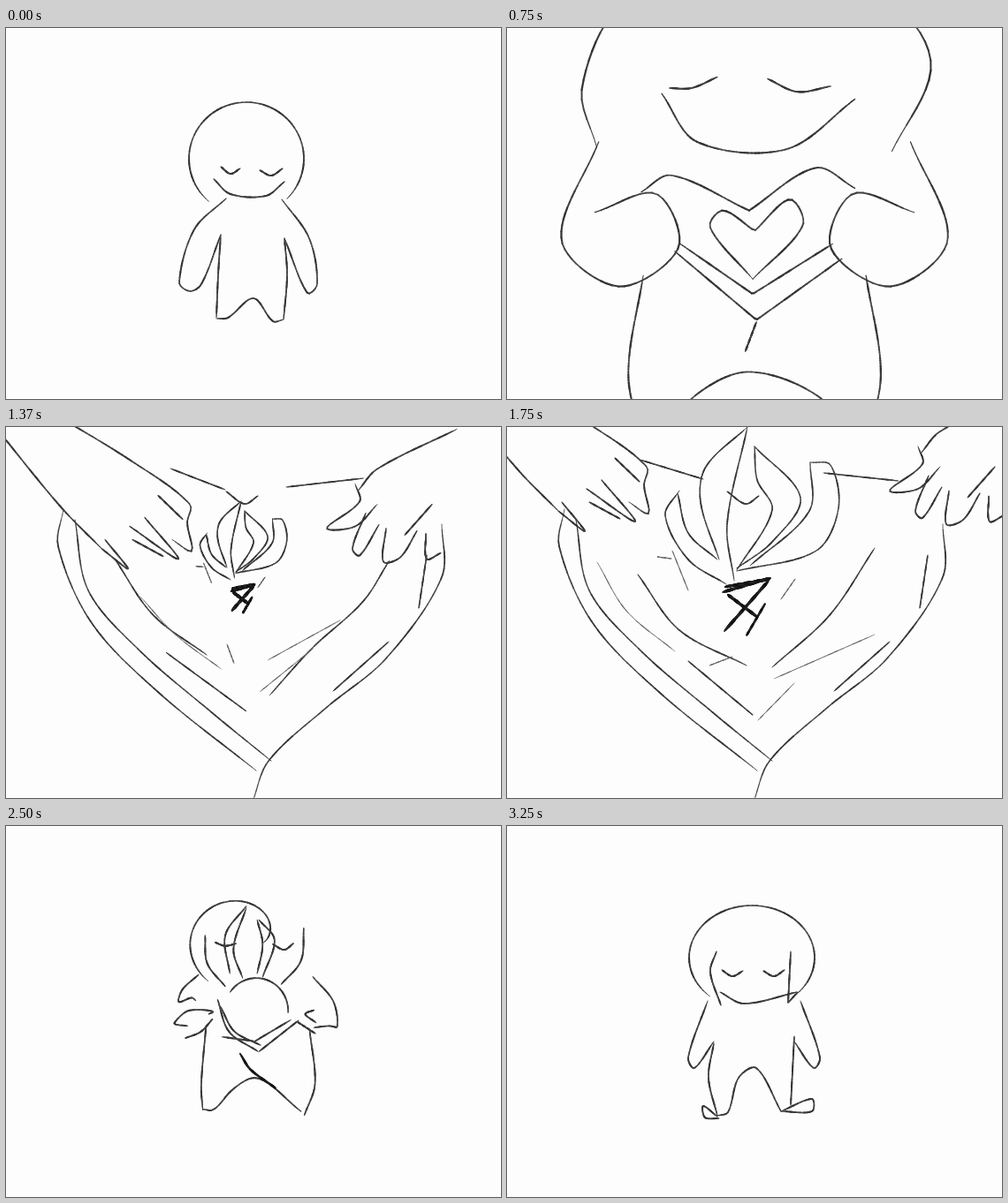
An HTML page with a canvas that plays this animation: 560x420 px, repeating every 3.37 s.

```html
<!DOCTYPE html>
<html lang="en">
<head>
<meta charset="utf-8">
<title>Heart bloom</title>
<style>
html, body { margin: 0; width: 100%; height: 100%; overflow: hidden; background: #fdfdfd; }
canvas { display: block; width: 560px; height: 420px; }
</style>
</head>
<body>
<canvas id="stage" width="560" height="420"></canvas>
<script>
const ctx = document.getElementById('stage').getContext('2d');
const LOOP = 3370;

// Smooth strokes through points; "/" lifts the pencil, a doubled point is a corner.
// "o" is an elliptic arc (centre, radii, angles); "~" mirrors another part about an axis.
const stand = {
  head: 'o 272 148 65 64 131 405',
  eyeL: '243 157 254 165 265 159',
  eyeR: '287 161 300 167 313 159',
  mouth: '235 171 254 188 294 190 315 174',
  armL: '249 193 213 228 196 288 208 298 221 290 243 234',
  armR: '312 194 343 238 352 290 341 300 315 238',
  bodyL: '243 234 240 280 238 328',
  arch: '238 329 251 328 280 306 302 332 314 330',
  bodyR: '315 238 318 280 314 330'
};

const love = {
  head: '186 212 178 180 200 134 270 100 352 141 366 170 345 214',
  eyeL: '225 180 237 180 251 174',
  eyeR: '278 175 294 182 312 179',
  mouth: '221 183 240 209 288 213 325 186',
  armL: '187 209 167 262 198 287 230 266 218 237 185 247',
  armR: '~271 armL',
  bodyL: '211 281 203 335 212 374',
  arch: '214 374 240 345 268 333 305 346 331 376',
  bodyR: '~271 bodyL',
  rim: '210 236 226 227 268 246 268 246 304 223 325 234 / 228 268 272 305 272 305 318 272',
  band: '231 264 270 291 270 291 313 264 / 272 306 266 322',
  core: '270 283 247 255 254 246 271 257 271 257 290 240 297 254 270 283'
};

const bloom = {
  head: 'o 277 132 68 62 135 425',
  eyeL: '233 121 252 126',
  eyeR: '301 127 312 131 319 123',
  hairL: '225 112 225 150 243 182',
  hairR: '328 97 327 145 305 178',
  petals: '272 98 249 130 254 172 / 272 100 258 145 268 177 / 284 113 290 140 284 172 / 286 113 303 135 290 176',
  ball: 'o 283 213 35 36 215 363',
  fold: '241 188 250 230 285 257 / 247 186 256 226 291 245 / 287 258 325 228',
  foldIn: '248 206 287 231 287 231 330 204',
  armL: '222 170 199 198 / 211 240 189 222 205 201 240 212 225 222 / 235 222 222 236 205 243',
  armR: '351 176 369 215 357 244 / 357 204 322 208 334 223 / 328 225 348 238',
  bodyL: '219 247 219 310 226 335',
  arch: '226 335 245 326 280 289 324 332',
  bodyR: '348 245 348 305 330 338',
  shade: '285 291 325 332'
};

const shawl = {
  head: 'o 280 138 76 62 130 265 / o 280 138 76 61 272 417',
  eyeL: '243 158 257 164 272 155',
  eyeR: '~286.5 eyeL',
  mouth: '232 186 280 200 319 186',
  hairL: '229 152 234 175 256 191',
  hairR: '~286.5 hairL',
  armL: '217 177 186 203 183 226 225 203 238 206 / 203 217 199 234 238 210',
  armR: '338 175 372 206 375 246 362 231 333 216 / 334 222 367 230',
  bodyL: '239 206 228 270 222 306',
  arch: '222 304 231 312 252 290 290 285 342 313',
  bodyR: '334 222 347 280 343 315',
  fold: '240 216 257 243 284 258 / 240 236 284 258 / 284 258 335 218',
  foldIn: '242 285 268 269 268 269 310 246',
  shade: '241 222 248 242 280 257 / 335 213 310 238'
};

const rest = {
  head: 'o 277 149 71 59 132 405',
  eyeL: '243 163 255 170 267 164',
  eyeR: '~278.5 eyeL',
  mouth: '241 188 268 201 328 188',
  hairL: '237 142 230 165 242 203',
  hairR: '321 142 318 200 318 200 329 188',
  armL: '227 198 205 262 212 274 234 244',
  armR: '~279.5 armL',
  bodyL: '234 246 228 285 238 328',
  arch: '238 328 250 324 262 285 282 274 310 323',
  bodyR: '325 238 321 316',
  feet: '238 329 222 317 224 330 240 331 / 310 323 345 309 345 323 310 323'
};

const heart = {
  rimL: '65 93 59 135 97 222 172 300 283 389',
  rimR: '493 110 493 170 430 262 362 318 297 378 279 424',
  inL: '78 105 93 185 150 252 235 325 300 378',
  inR: '476 145 467 205 / 433 243 370 299'
};
const shut = {
  top: '222 57 274 83 / 276 84 366 55',
  creaseL: '99 133 140 200 183 246 / 158 246 265 317',
  creaseR: '297 335 350 265 420 215 451 166',
  thin: '202 231 297 294 / 245 232 287 265 / 290 243 341 202 / 291 267 370 212'
};
const open = {
  top: '150 37 222 59 / 358 52 443 61 / 249 73 270 87 285 78',
  creaseL: '148 167 195 230 271 270 / 205 265 278 326',
  creaseR: '300 272 365 213 416 137',
  thin: '102 153 135 208 190 254 / 255 260 229 270 / 302 285 416 235 / 284 332 325 290'
};

const holdL = {
  arm: '125 -8 160 32 / 162 33 222 54 / 222 56 263 100 260 153 / -70 -4 0 42 102 122',
  fingers: '104 125 165 158 198 195 208 180 183 139 / 236 102 260 140 / 219 120 246 153 248 182 232 187 / 188 138 228 162 241 187'
};
const holdR = {
  arm: '500 -2 453 28 / 440 36 366 50 / 364 56 318 72 313 103 / 630 60 485 118 475 135 / 469 149 437 162',
  knuckles: '318 103 288 115 286 145 / 283 112 269 138 284 153 / 345 130 308 136 284 158',
  fingers: '346 130 318 148 314 190 335 190 360 160 / 372 158 348 190 358 215 370 178 / 410 160 417 195 436 165 / 432 138 372 183'
};
const pullL = {
  arm: '-60 -40 12 48 58 95 / 0 -60 92 -4 158 45 155 66 160 98 138 85',
  fingers: '122 35 150 62 / 107 60 145 107 90 70 / 62 85 88 118 58 95 / 93 85 128 104'
};
const pullR = {
  arm: '580 -40 490 5 468 30 / 465 22 470 42 433 72 465 70 490 45',
  fingers: '477 55 462 95 470 103 492 68 / 500 72 497 110 516 105 535 75 / 545 78 546 107 562 100 / 552 45 521 80'
};

const bud = {
  core: '248 160 265 152 280 160 / 245 168 241 185 271 225 271 225 305 203 / 285 162 315 180 301 206'
};
const flower = {
  tall: '272 0 225 45 219 85 240 150 / 272 0 249 110 257 174',
  mid: '280 22 283 60 300 94 260 162 / 280 22 332 80 300 130 260 160',
  right: '343 40 366 43 375 92 350 140 260 163 / 343 40 342 95 275 157',
  left: '195 72 179 100 205 150 248 178 / 193 75 205 120 238 150',
  thin: '170 147 186 149 / 187 140 205 185 / 310 195 326 172'
};
const scribble = {
  ink: '244 187 298 171 / 296 174 246 231 / 250 190 283 215 / 247 181 297 172',
  shade: '292 200 271 236'
};

const WIDTH = { ink: 3.4, shade: 2.5, thin: 1 };
const N = 64;
const mix = (a, b, k) => a + (b - a) * k;
const ease = k => k * k * (3 - 2 * k);

function arc(x, y, rx, ry, from, to) {
  return Array.from({ length: N }, (_, i) => {
    const a = mix(from, to, i / (N - 1)) * Math.PI / 180;
    return [x + rx * Math.cos(a), y + ry * Math.sin(a)];
  });
}

function curve(text) {
  const v = text.match(/-?[\d.]+/g).map(Number), p = [];
  if (text.includes('o')) return arc(...v);
  for (let i = 0; i < v.length; i += 2) p.push([v[i], v[i + 1]]);
  const out = [p[0]];
  for (let i = 0; i + 1 < p.length; i++) {
    const b = p[i], c = p[i + 1];
    const span = Math.hypot(c[0] - b[0], c[1] - b[1]);
    if (!span) continue;
    const a = p[i - 1] || b, d = p[i + 2] || c;
    // Tangents scaled to the span keep uneven spacing smooth.
    const slope = (q, r, s, n) => {
      const len = Math.hypot(r[0] - q[0], r[1] - q[1]) + Math.hypot(s[0] - r[0], s[1] - r[1]);
      return (s[n] - q[n]) / len * span;
    };
    for (let j = 1; j <= 16; j++) {
      const t = j / 16, e = ease(t);
      out.push([0, 1].map(n => mix(b[n], c[n], e)
        + t * (1 - t) * ((1 - t) * slope(a, b, c, n) - t * slope(b, c, d, n))));
    }
  }
  return resample(out);
}

function resample(p) {
  const len = [0];
  for (let i = 1; i < p.length; i++)
    len.push(len[i - 1] + Math.hypot(p[i][0] - p[i - 1][0], p[i][1] - p[i - 1][1]));
  const out = [];
  for (let n = 0, i = 1; n < N; n++) {
    const d = len[len.length - 1] * n / (N - 1);
    while (i < p.length - 1 && len[i] < d) i++;
    const k = (d - len[i - 1]) / (len[i] - len[i - 1] || 1);
    out.push([mix(p[i - 1][0], p[i][0], k), mix(p[i - 1][1], p[i][1], k)]);
  }
  return out;
}

const cache = new Map();
function strokes(pose) {
  if (!cache.has(pose)) {
    const all = {};
    for (const part in pose) {
      const [axis, twin] = pose[part].slice(1).split(' ');
      const flip = pose[part][0] === '~';
      (flip ? pose[twin] : pose[part]).split('/').forEach((s, i) => {
        const line = curve(s);
        all[part + ':' + i] = flip ? line.map(([x, y]) => [2 * axis - x, y]) : line;
      });
      // Mirrored eyes, like drawn ones, run left to right.
      if (flip && part === 'eyeR') all['eyeR:0'].reverse();
    }
    cache.set(pose, all);
  }
  return cache.get(pose);
}

function blend(from, to, k) {
  const a = strokes(from), b = strokes(to), out = {};
  for (const id of new Set([...Object.keys(a), ...Object.keys(b)])) {
    if (a[id] && b[id])
      out[id] = a[id].map((p, i) => [mix(p[0], b[id][i][0], k), mix(p[1], b[id][i][1], k)]);
    else if (k < 0.5 ? a[id] : b[id]) out[id] = a[id] || b[id];
  }
  return out;
}

// Scale about (ox, oy), then shift.
function place(all, ox, oy, sx, sy = sx, dx = 0, dy = 0) {
  const out = {};
  for (const id in all)
    out[id] = all[id].map(([x, y]) => [ox + (x - ox) * sx + dx, oy + (y - oy) * sy + dy]);
  return out;
}

function pencil(all, weight = 1.8) {
  let seed = 3;
  for (const id in all) {
    const p = all[id], w = WIDTH[id.split(':')[0]] || weight;
    seed += 7.3;
    for (let i = 1; i < N; i++) {
      const grain = Math.sin(i * 0.41 + seed) * 0.5 + Math.sin(i * 1.7 + seed * 2) * 0.3;
      const taper = Math.min(1, 0.5 + Math.min(i, N - i) / 10);
      const tone = Math.round(62 - grain * 18 + (w < 1.2 ? 45 : w > 2.4 ? -35 : 0));
      ctx.strokeStyle = `rgb(${tone},${tone},${tone})`;
      ctx.lineWidth = w * taper * (1 + grain * 0.22);
      ctx.beginPath();
      ctx.moveTo(...p[i - 1]);
      ctx.lineTo(...p[i]);
      ctx.stroke();
    }
  }
}

function closeUp(k, zoom = 1) {
  const show = (all, w = 1.6) => pencil(place(all, 278, 230, zoom), w);
  const hand = (hold, pull, dx) => {
    const late = k < 0.5 ? k : k - 1;
    show(place(strokes(k < 0.5 ? hold : pull), 0, 0, 1, 1, dx * late, -85 * late), 1.8);
  };
  show(strokes(heart));
  show(blend(shut, open, k));
  hand(holdL, pullL, -100);
  hand(holdR, pullR, 140);
  if (k < 0.4) show(strokes(bud));
  if (k > 0.2) show(place(strokes(flower), 260, 168, k));
  if (k >= 0.5) show(place(strokes(scribble), 265, 185, k));
}

const figure = (from, to, k, sx = 1, sy = 1, dx = 0) =>
  pencil(place(blend(from, to, k), 279, 338, sx, sy, dx));
const zoomLove = (s, dx, dy) => pencil(place(strokes(love), 270, 240, s, s, dx, dy), 2);

function draw(n) {
  if (n <= 4) figure(stand, love, ease(n / 4));
  else if (n === 5) zoomLove(1.33, 7, -6);
  else if (n === 6) zoomLove(2.1, 8, -46);
  else if (n <= 14) closeUp(ease(Math.max(0, n - 8) / 6), n === 7 ? 0.76 : 1);
  else if (n <= 18) figure(bloom, bloom, 0, 1, n === 15 ? 0.97 : n === 16 ? 1.04 : 1);
  else if (n <= 21) figure(bloom, shawl, [0.12, 0.45, 0.82][n - 19], 1 + (n - 19) * 0.03, 1.03);
  else if (n === 22) figure(shawl, shawl, 0);
  else if (n === 23) figure(shawl, rest, 0.04, 1.04, 1, -5);
  else figure(shawl, rest, [0.4, 0.8, 1][n - 24], 1, [1.05, 1.02, 1][n - 24]);
}

// Eight drawings a second, with times cut to hundredths.
const celAt = t => Math.floor((Math.floor(t / 10) * 10 + 5) / 125);

let last = -1;
const start = performance.now();
function tick() {
  const n = celAt((performance.now() - start) % LOOP);
  if (n !== last) {
    last = n;
    ctx.fillStyle = '#fdfdfd';
    ctx.fillRect(0, 0, 560, 420);
    ctx.lineCap = ctx.lineJoin = 'round';
    draw(n);
  }
  requestAnimationFrame(tick);
}
tick();
</script>
</body>
</html>
```
